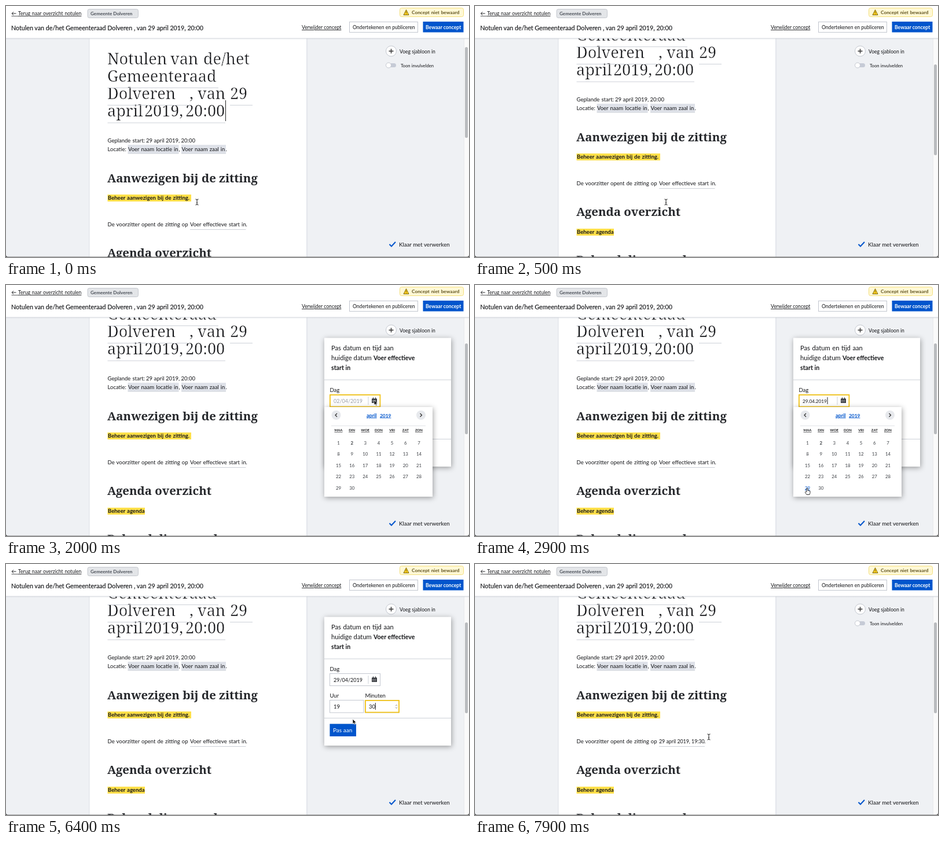
Recreate the animation shown at these times as an HTML page. Size 800x434 px, loop 8000 ms.

```html
<!DOCTYPE html>
<html lang="nl">
<head>
<meta charset="utf-8">
<title>Notulen</title>
<style>
  html, body { margin: 0; width: 100%; height: 100%; overflow: hidden; background: #eff1f4; }
  svg { display: block; width: 100%; height: 100%; }
  text { font: 9.5px Lato, "Open Sans", sans-serif; fill: #141518; white-space: pre; }
  .serif { font: 300 27px "Noto Serif", serif; stroke: #fff; stroke-width: .55; }
  .h2 { font: 700 20.4px "Noto Serif", serif; fill: #26282c; }
  .title { font-size: 10.7px; stroke: #141518; stroke-width: .15; }
  .ws { word-spacing: .7px; }
  .b { font-weight: 700; }
  .small { font-size: 8.6px; }
  .big { font-size: 11.2px; }
  .big.b { font-size: 10.6px; }
  .link { text-decoration: underline; }
  .hint { fill: #9a9fa8; }
  .white { fill: #fff; }
  .blue { fill: #0055cc; }
  .rule { stroke: #cdd1d8; fill: none; }
  .tag { fill: #dfe2e9; }
  .mark { fill: #ffe04a; }
  .box { fill: #fff; stroke: #c3c7cf; }
  .focus { fill: none; stroke: #f2c318; stroke-width: 1.8; }
  .caret { stroke: #222; }
  .pop { filter: drop-shadow(1px 2px 5px rgba(0, 0, 0, .36)); }
  .mid text { text-anchor: middle; }
  .wd { font-size: 6px; font-weight: 700; text-decoration: underline; }
  .day { font-size: 7.8px; fill: #3c3f44; }
</style>
</head>
<body>
<svg viewBox="0 0 800 434" preserveAspectRatio="none">
  <defs>
    <linearGradient id="fade" x2="0" y2="1">
      <stop stop-color="#c9cdd4"/><stop offset="1" stop-color="#c9cdd4" stop-opacity="0"/>
    </linearGradient>
    <g id="spin" fill="none" stroke="#777" stroke-width=".8">
      <path d="M-1.6-1.2L0-3L1.6-1.2M-1.6 1.2L0 3L1.6 1.2"/>
    </g>
  </defs>

  <rect width="800" height="434" fill="#eff1f4"/>
  <rect x="143" y="50" width="378" height="390" fill="#e3e6eb"/>
  <rect x="144.5" y="50" width="374.5" height="390" fill="#fff"/>

  <g id="page">
    <text class="serif" x="175" y="101">Notulen</text>
    <text class="serif" x="284" y="101">van</text>
    <text class="serif" x="341" y="101">de/het</text>
    <text class="serif" x="175" y="131">Gemeenteraad</text>
    <text class="serif" x="175" y="161">Dolveren</text>
    <text class="serif" x="317" y="161">,</text>
    <text class="serif" x="331" y="161">van</text>
    <text class="serif" x="387" y="161">29</text>
    <text class="serif" x="175" y="191">april</text>
    <text class="serif" x="239" y="191">2019,</text>
    <text class="serif" x="310" y="191">20:00</text>
    <path class="rule" d="M175.5 141.5H367M175.5 171.5H317M387 171.5H426M175.5 202H379"/>
    <path class="caret" data-on="0-150" d="M379.5 163V199"/>

    <text class="ws" x="175.5" y="236">Geplande start:</text>
    <text x="242" y="236" font-size="9.3">29 april 2019, 20:00</text>
    <path class="tag" d="M210.5 240H298.5V255H210.5ZM303 240H380V255H303Z"/>
    <path class="rule" d="M210.5 255H298.5M303 255H380"/>
    <text x="175.5" y="251">Locatie:</text>
    <text class="ws" x="211" y="251">Voer naam locatie in</text><text x="298.5" y="251">,</text>
    <text class="ws" x="303.5" y="251">Voer naam zaal in</text><text x="379.5" y="251">.</text>

    <text class="h2" x="175" y="305">Aanwezigen bij de zitting</text>
    <rect class="mark" x="175.5" y="326" width="144.5" height="12"/>
    <text class="b ws" x="176" y="335">Beheer aanwezigen bij de zitting.</text>

    <text class="ws" x="175.5" y="381">De voorzitter opent de zitting op</text>
    <g data-on="0-6700">
      <text class="ws" x="318" y="381">Voer effectieve start in</text>
      <text x="414.5" y="381">.</text>
      <path class="rule" d="M318 386.5H414.5"/>
    </g>
    <g data-on="6700-8000">
      <text x="318" y="381" style="font-size:8.8px">29 april 2019, 19:30</text>
      <text x="396" y="381">.</text>
      <path class="rule" d="M318 386.5H397"/>
    </g>
    <path class="caret" data-on="900-1400" d="M356.5 371V384"/>

    <text class="h2" x="175" y="434">Agenda overzicht</text>
    <rect class="mark" x="175.5" y="456" width="64.5" height="12"/>
    <text class="b ws" x="176" y="465">Beheer agenda</text>
    <text class="h2" x="175" y="517">Behandeling van de</text>
  </g>

  <rect x="791" y="56" width="9" height="378" fill="#fafafa"/>
  <path d="M791.5 56V434" stroke="#e9eaec"/>
  <rect id="thumb" x="793" y="71" width="5" height="157" rx="2.5" fill="#b9bbbe"/>

  <!-- header -->
  <rect y="55" width="800" height="3" fill="url(#fade)"/>
  <rect width="800" height="55.5" fill="#fff"/>
  <path d="M17.5 13H10M13 10.2L10 13L13 15.8" fill="none" stroke="#141518" stroke-width=".9"/>
  <path d="M9.5 17.5H21" stroke="#141518" stroke-width=".7"/>
  <text class="small link ws" x="21" y="16">Terug naar overzicht notulen</text>
  <rect x="141" y="5.5" width="87.5" height="15" rx="3" fill="#e3e5e8" stroke="#c6c9cf"/>
  <text class="b" x="146" y="16" style="font-size:8.1px;fill:#4a4f57">Gemeente Dolveren</text>
  <text class="title" x="9" y="42">Notulen van de/het Gemeenteraad Dolveren , van 29 april 2019, 20:00</text>
  <text class="small link" x="511" y="40">Verwijder concept</text>
  <rect class="box" x="593.5" y="27.5" width="118" height="18"/>
  <text class="small" x="599" y="39.5">Ondertekenen en publiceren</text>
  <rect class="blue" x="720.5" y="27" width="70" height="18.5"/>
  <text class="small white b" x="725" y="39.5">Bewaar concept</text>
  <rect x="680.5" y="3.5" width="110" height="15" rx="3" fill="#fff8d5" stroke="#f3df7c"/>
  <path d="M691.5 6.5L696 15.5H687Z" fill="#ffd21f" stroke="#7c6610" stroke-linejoin="round"/>
  <path d="M691.5 9.5V12.3M691.5 13.2V14.2" stroke="#5f5010" stroke-width=".9"/>
  <text class="b ws" x="701" y="14" style="font-size:8.3px;fill:#5f531f">Concept niet bewaard</text>

  <!-- side tools -->
  <circle cx="665.5" cy="78" r="9" class="box"/>
  <path d="M661.5 78H669.5M665.5 74V82" stroke="#333" stroke-width="1.4"/>
  <text class="small" x="680" y="81.5">Voeg sjabloon in</text>
  <rect x="657" y="99" width="17" height="7" rx="3.5" fill="#c6cbd6"/>
  <circle cx="661" cy="102.5" r="4.5" class="box"/>
  <text x="682" y="105.5" style="font-size:7.7px">Toon invulvelden</text>
  <path d="M662.5 412L666 415.5L673 408" fill="none" stroke="#0055cc" stroke-width="2"/>
  <text x="679" y="415.5" style="font-size:9.7px">Klaar met verwerken</text>

  <!-- date panel -->
  <g data-on="1000-6700">
    <rect class="pop" x="550" y="91.5" width="219" height="222.5" fill="#fff"/>
    <path class="rule" d="M550 164H769M550 266.5H769"/>
    <text class="big ws" x="562" y="112.5">Pas datum en tijd aan</text>
    <text class="big" x="562" y="129.5">huidige datum</text>
    <text class="big b" x="635" y="129.5">Voer effectieve</text>
    <text class="big b" x="562" y="146.5">start in</text>

    <text x="559.5" y="185">Dag</text>
    <rect class="box" x="559.5" y="189.5" width="87" height="21"/>
    <path class="rule" d="M626 193V207"/>
    <path d="M632 196.5H641V204H632Z" fill="#33363b"/>
    <path d="M634.5 194.5V197M638.5 194.5V197" stroke="#33363b" stroke-width="1.3"/>
    <path d="M633 199.5H640M633 201.8H640" stroke="#fff" stroke-width=".9" stroke-dasharray="1.4 1"/>
    <text class="hint" x="566" y="203.5" data-on="1000-2800" style="font-size:9px">02/04/2019</text>
    <text x="566" y="203.5" data-on="2800-3100" style="font-size:8.2px">29.04.2019</text>
    <text x="566" y="203.5" data-on="3100-6700" style="font-size:9px">29/04/2019</text>
    <rect class="focus" x="559.9" y="190" width="86.5" height="20.5" data-on="1900-3400"/>
    <path class="caret" data-on="2800-3100" d="M609 194V206"/>

    <text x="559.5" y="231">Uur</text>
    <text x="620.5" y="231">Minuten</text>
    <rect class="box" x="559.5" y="235.5" width="58.5" height="21.5"/>
    <rect class="box" x="620.5" y="235.5" width="58.5" height="21.5"/>
    <text class="hint" x="566" y="249.5" data-on="1000-4700">12</text>
    <text x="566" y="249.5" data-on="4700-4900">1</text>
    <text x="566" y="249.5" data-on="4900-6700">19</text>
    <text class="hint" x="627" y="249.5" data-on="1000-5700">00</text>
    <text x="627" y="249.5" data-on="5700-5900">3</text>
    <text x="627" y="249.5" data-on="5900-6700">30</text>
    <rect class="focus" x="559.9" y="236" width="58" height="20.5" data-on="3600-5300"/>
    <rect class="focus" x="621" y="236" width="58" height="20.5" data-on="5300-6600"/>
    <use href="#spin" x="613.5" y="246.5" data-on="1100-1300 3500-5300"/>
    <use href="#spin" x="674.5" y="246.5" data-on="5200-6600"/>
    <path class="caret" data-on="3600-4100 4600-4700" d="M566.5 240V252"/>
    <path class="caret" data-on="4900-5300" d="M577.5 240V252"/>
    <path class="caret" data-on="5300-5700" d="M627.5 240V252"/>
    <path class="caret" data-on="5900-6500" d="M638.3 240V252"/>

    <rect x="559.5" y="276.5" width="45.5" height="21.5" fill="#c2c7d0"/>
    <rect class="blue" x="559.5" y="276.5" width="45.5" height="21.5" data-on="5700-6700"/>
    <text class="white" x="565" y="291" style="font-size:10px">Pas aan</text>
  </g>

  <!-- date picker -->
  <g data-on="1900-3100">
    <rect class="pop" x="550" y="211" width="187" height="155" fill="#fff"/>
    <circle cx="570.5" cy="225" r="8" fill="#e7e9ed"/>
    <circle cx="717" cy="225" r="8" fill="#e7e9ed"/>
    <path d="M572 222L569 225L572 228M715.5 222L718.5 225L715.5 228" fill="none" stroke="#333" stroke-width="1.3"/>
    <text class="b link blue" x="623" y="228.5" style="font-size:9px">april</text>
    <text class="b link blue" x="646" y="228.5" style="font-size:8.4px">2019</text>
    <path class="rule" d="M562 243.5H725" stroke-opacity=".6"/>
    <g id="days" class="mid"></g>
  </g>

  <path d="M0 433.5H800" stroke="#777" stroke-opacity=".6"/>
  <path d="M0 434V430Q0 434 4 434ZM800 434V430Q800 434 796 434Z" fill="#333"/>

  <g id="cursor">
    <g data-cursor="beam" fill="none">
      <path d="M-2.5-5Q0-5 0-3.5Q0-5 2.5-5M0-4V4M-2.5 5Q0 5 0 3.5Q0 5 2.5 5M-1 1H1" stroke="#fff" stroke-width="2.2" stroke-opacity=".7"/>
      <path d="M-2.5-5Q0-5 0-3.5Q0-5 2.5-5M0-4V4M-2.5 5Q0 5 0 3.5Q0 5 2.5 5M-1 1H1" stroke="#222"/>
    </g>
    <path data-cursor="arrow" d="M0 0V8.5L2 6.7L3.4 9.8L4.9 9.1L3.5 6.2H6.2Z" fill="#111" stroke="#fff" stroke-width=".7"/>
    <path data-cursor="hand" d="M-1 5V-1Q0-2.5 1 -1V2.3L5 3.3V6.5L4 9.5H-1L-3.6 5.5Q-3.5 4-2.2 4.5Z" fill="#fff" stroke="#222" stroke-width=".9"/>
  </g>
</svg>

<script>
const LOOP = 8000, STEP = 100, SCROLL = 71;

// time, x, y, pointer shape from that time on
const path = [
  [0, 330, 339, "beam"], [600, 330, 339, "beam"], [800, 356, 308, "beam"],
  [900, 356, 308, "arrow"], [1200, 624, 246, "beam"], [1400, 632, 215, "arrow"],
  [1600, 636, 199, "hand"], [2000, 636, 199, "arrow"], [2500, 578, 340, "hand"],
  [2700, 574, 353, "hand"], [3000, 574, 353, "arrow"], [3400, 580, 246, "beam"],
  [5000, 580, 246, "beam"], [5300, 645, 247, "beam"], [6000, 645, 247, "arrow"],
  [6400, 599, 268, "arrow"], [6500, 592, 286, "hand"], [6800, 592, 286, "arrow"],
  [7000, 540, 292, "beam"], [7500, 404, 299, "beam"], [LOOP, 404, 299, "beam"]
];

const $ = id => document.getElementById(id);
const ease = p => p * p * (3 - 2 * p);
const clamp = p => Math.min(1, Math.max(0, p));

function addText(x, y, label, className) {
  const node = document.createElementNS("http://www.w3.org/2000/svg", "text");
  node.setAttribute("x", x);
  node.setAttribute("y", y);
  node.setAttribute("class", className);
  node.textContent = label;
  $("days").append(node);
  return node;
}

const column = i => 574.5 + 23.15 * (i % 7);
"MAA DIN WOE DON VRI ZAT ZON".split(" ").forEach((name, i) => addText(column(i), 253, name, "wd"));
for (let i = 0; i < 30; i++) {
  const node = addText(column(i), 275.5 + 19.5 * Math.floor(i / 7), i + 1, i === 1 ? "day b" : "day");
  if (i === 28) node.id = "pick";
}

const timed = [...document.querySelectorAll("[data-on]")].map(node => ({
  node,
  spans: node.dataset.on.split(" ").map(span => span.split("-").map(Number))
}));
const pointers = [...document.querySelectorAll("[data-cursor]")];

function draw(t) {
  for (const { node, spans } of timed)
    node.style.display = spans.some(([from, to]) => t >= from && t < to) ? "" : "none";

  const scroll = ease(clamp(t / 500));
  $("page").setAttribute("transform", `translate(0 ${-SCROLL * scroll})`);
  $("thumb").setAttribute("y", 71 + 30 * scroll);

  const next = path.findIndex(stop => stop[0] > t);
  const [t0, x0, y0, shape] = path[next - 1];
  const [t1, x1, y1] = path[next];
  const p = ease((t - t0) / (t1 - t0));
  $("cursor").setAttribute("transform", `translate(${x0 + (x1 - x0) * p} ${y0 + (y1 - y0) * p})`);
  for (const node of pointers) node.style.display = node.dataset.cursor === shape ? "" : "none";

  const hover = t >= 2600 && t < 3100;
  $("pick").style.fill = hover ? "#0055cc" : "";
  $("pick").style.textDecoration = hover ? "underline" : "";
}

const start = performance.now();
function frame() {
  const t = (performance.now() - start) % LOOP;
  draw(Math.floor(t / STEP) * STEP);
  requestAnimationFrame(frame);
}
draw(0);
requestAnimationFrame(frame);
</script>
</body>
</html>
```
